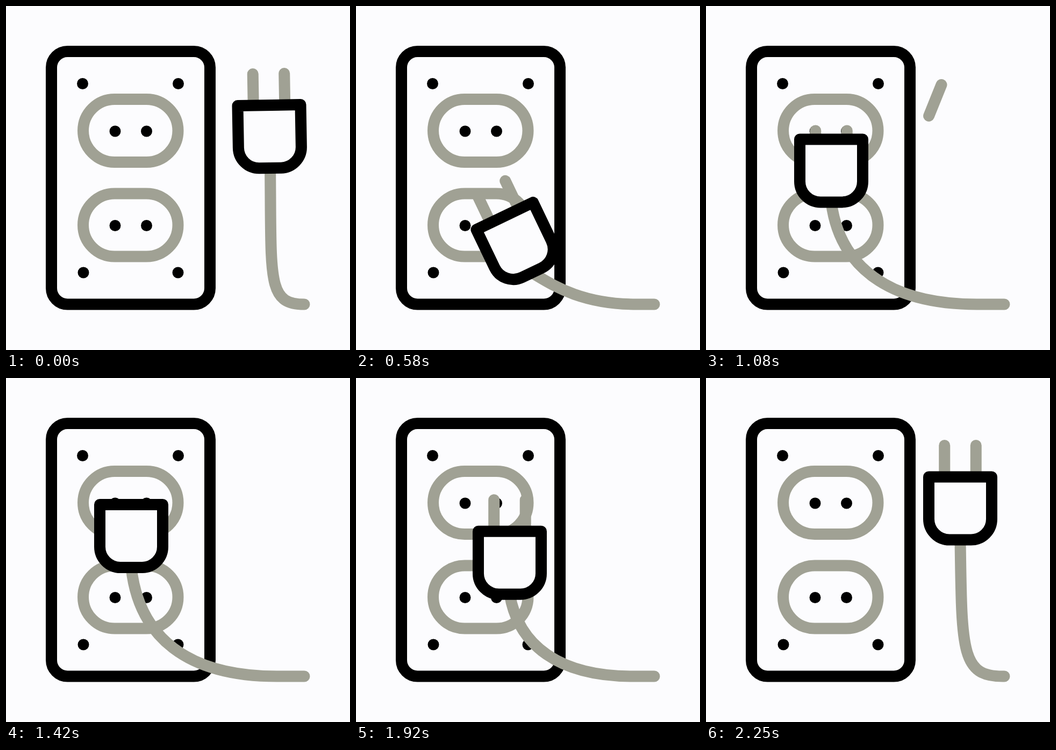
Animation, 640 px wide and 640 px high, one loop 2.33 s. Source, as an HTML page:

```html
<!DOCTYPE html>
<html lang="en">
<head>
<meta charset="utf-8">
<title>Plug and outlet</title>
<style>
  html, body { margin: 0; height: 100%; overflow: hidden; background: #fcfcfe; }
  svg { display: block; width: 100%; height: 100%; }
  .line { fill: none; stroke-width: 21; stroke-linecap: round; stroke-linejoin: round; }
  .dark { stroke: #000; }
  .soft { stroke: #a0a194; }
</style>
</head>
<body>
<svg viewBox="0 0 640 640">
  <rect class="line dark" x="84.5" y="84.5" width="295" height="470.5" rx="30"/>
  <rect class="line soft" x="143.5" y="173.5" width="176.5" height="117" rx="58.5"/>
  <rect class="line soft" x="143.5" y="349" width="176.5" height="117" rx="58.5"/>
  <g id="dots"></g>
  <path id="bolt" class="line soft" pathLength="1" d="M438 146.5l-24 59.5h59l-24 59.5"/>
  <path id="cord" class="line soft"/>
  <g id="plug">
    <path id="prongs" class="line soft"/>
    <path class="line dark" style="fill:#fcfcfe" d="M-58.5 0H58.5V78.5A38.5 38.5 0 0 1 20 117H-20A38.5 38.5 0 0 1 -58.5 78.5Z"/>
  </g>
</svg>
<script>
const $ = id => document.getElementById(id);
const LOOP = 2330, PRONG = 58.5, BODY = 117, SOCKET_X = 233, SOCKET_Y = 232, FLOOR = 555;

const clamp = v => Math.max(0, Math.min(1, v));
const mix = (a, b, u) => a + (b - a) * u;
const smooth = u => u * u * (3 - 2 * u);
const easeOut = u => u * (2 - u);
const bezier = (u, a, b, c, d) => {
  const v = 1 - u;
  return a * v ** 3 + 3 * b * v * v * u + 3 * c * v * u * u + d * u ** 3;
};

// Screws at the corners, then a pair of holes per socket
const dot = (x, y) => `<circle cx="${x}" cy="${y}" r="10.5"/>`;
const pair = (x, y, gap) => dot(x, y) + dot(x + gap, y);
$('dots').innerHTML = pair(142.5, 144.5, 178) + pair(144, 496, 176)
  + pair(203, 233, 58.5) + pair(203, 408.5, 58.5);

// Swing to the socket, push in, rest, pull out, swing back
function plugAt(step) {
  if (step < 11) {
    const u = smooth(step / 11);
    return [
      bezier(u, 489.5, 401, 244, SOCKET_X),
      bezier(u, 184.5, 391.5, 485, 285),
      bezier(u, -1, -7, -55, 0)
    ];
  }
  if (step <= 17) return [SOCKET_X, mix(285, 235.5, easeOut(clamp((step - 11) / 4))), 0];
  if (step <= 21) return [SOCKET_X, mix(235.5, 291, smooth((step - 17) / 4)), 0];
  const u = smooth((step - 21) / 7);
  return [bezier(u, SOCKET_X, 328, 388, 489.5), bezier(u, 291, 307, 174, 184.5), 0];
}

// The cord hangs from (x, y), bends and runs flat to its fixed end
function cordPath(x, y) {
  const drop = FLOOR - y, slack = (555 - x) / drop;
  const flat = 555 - 0.2 * Math.max(0, 490 - x);
  const bend = flat - 0.5 * (flat - x) - 0.15 * drop;
  return `M${x} ${y}C${x + 9 * slack} ${y + drop * (0.85 - 0.13 * slack)} `
    + `${bend} ${FLOOR} ${flat} ${FLOOR}H555`;
}

function draw(now) {
  const step = Math.floor((now % LOOP + 3.5) * 12 / 1000);
  const [x, y, angle] = plugAt(step);
  const rad = angle * Math.PI / 180;

  $('plug').setAttribute('transform', `translate(${x} ${y}) rotate(${angle})`);
  $('cord').setAttribute('d', cordPath(x - BODY * Math.sin(rad), y + BODY * Math.cos(rad)));

  // Prongs sink into the upper socket
  const len = x === SOCKET_X ? Math.min(PRONG, y - SOCKET_Y) : PRONG;
  $('prongs').setAttribute('d', len > 5 ? `M-29.25 0v${-len}M29.25 0v${-len}` : '');

  const head = clamp((step - 12) / 3), tail = clamp((step - 14) / 3);
  $('bolt').style.display = head > tail ? '' : 'none';
  $('bolt').setAttribute('stroke-dasharray', `${head - tail} 2`);
  $('bolt').setAttribute('stroke-dashoffset', -tail);
}

const origin = performance.now();
function tick() {
  draw(performance.now() - origin);
  requestAnimationFrame(tick);
}
tick();
</script>
</body>
</html>
```
